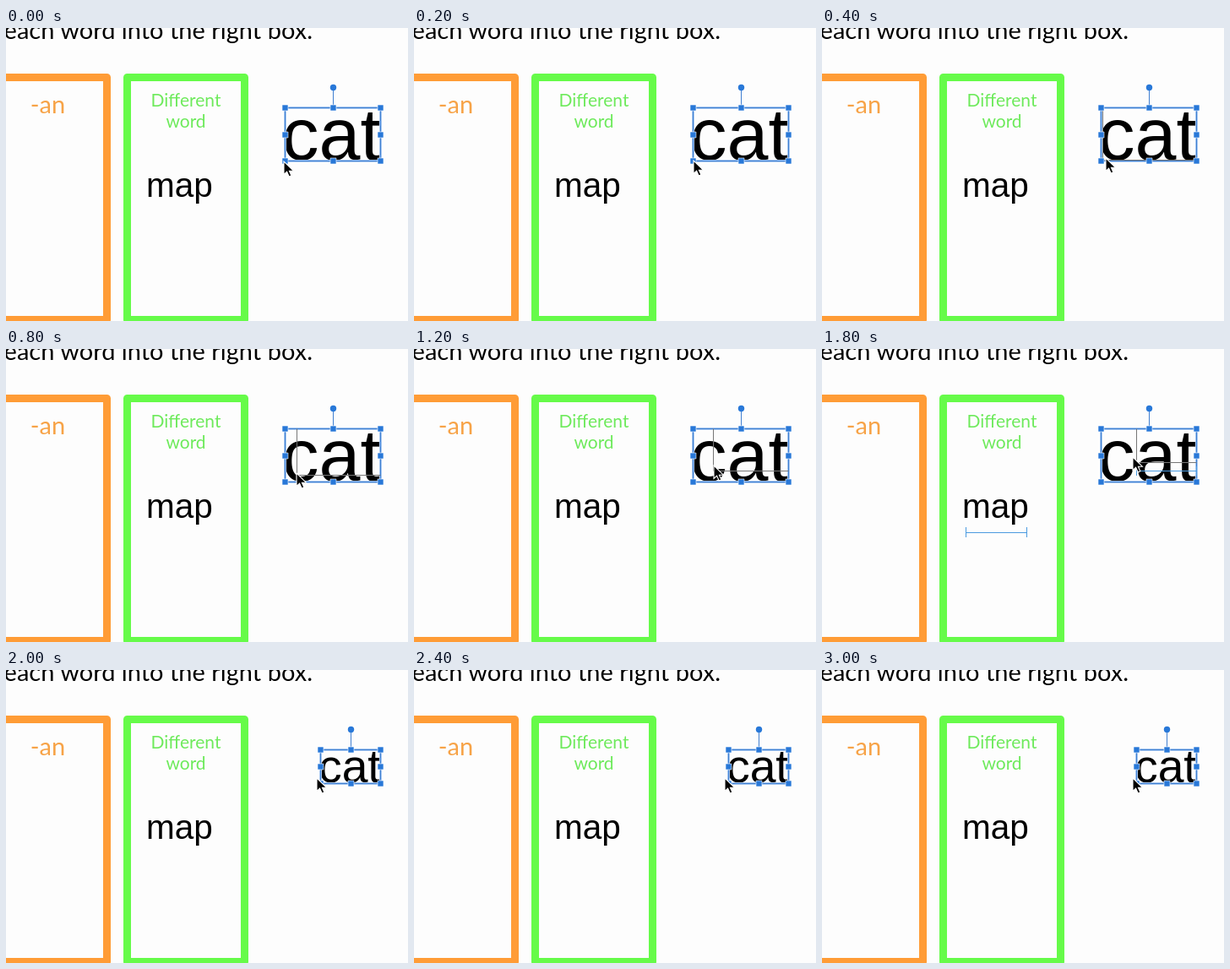
Animation of 476 by 347 pixels, one loop 3200 ms. Source, as an HTML page:

```html
<!DOCTYPE html>
<html lang="en">
<head>
<meta charset="utf-8">
<title>Resizing a word</title>
<style>
  html, body { margin: 0; width: 100%; height: 100%; overflow: hidden; background: #fdfdfd; }
  svg { display: block; }
  text { font-family: Lato, sans-serif; }
  .word { font-family: "Liberation Sans", Arial, sans-serif; fill: #000; }
  .card { fill: none; stroke-width: 9; stroke-linejoin: round; }
  .guide { fill: none; stroke: #4b9be0; }
  .glow { fill: none; stroke: #a9c9f2; stroke-width: 3; }
  .edge { fill: none; stroke: #3f7fd0; }
  .handle { fill: #2878d8; stroke: #fff; stroke-width: .6; }
  .preview { fill: none; stroke: #777; }
</style>
</head>
<body>
<svg width="476" height="347" viewBox="0 0 476 347">
  <rect width="476" height="347" fill="#fdfdfd"/>
  <text x="363" y="12.5" font-size="29" text-anchor="end">each word into the right box.</text>

  <rect class="card" x="-40" y="58.5" width="159.5" height="287" stroke="#ff9c36"/>
  <text x="49.5" y="101" font-size="29" text-anchor="middle" fill="#f7a347">-an</text>

  <rect class="card" x="143.5" y="58.5" width="139" height="287" stroke="#66fb49"/>
  <g font-size="21" text-anchor="middle" fill="#6eea5c">
    <text x="213" y="92.5">Different</text>
    <text x="213" y="117.5">word</text>
  </g>
  <text class="word" x="166" y="200" font-size="40.5">map</text>

  <text class="word" id="cat">cat</text>
  <rect class="glow" id="glow"/>
  <rect class="edge" id="edge"/>
  <path class="preview" id="preview"/>
  <path class="guide" id="guides" d="M170.5 211v12M242.5 211v12M170.5 217.5h72M372.5 139v11M443.5 139v11M372.5 144.5h71"/>
  <path class="edge" id="stem"/>
  <circle id="knob" cy="70.5" r="3.7" fill="#2878d8"/>
  <path class="handle" id="handles"/>
  <path id="cursor" d="M0 0V15.5L3.6 12.2L6.2 18L8.9 16.8L6.4 11.2H11.4Z" stroke="#fff" stroke-width="1.1"/>
</svg>
<script>
const LOOP = 3200, STEP = 200;
const RIGHT = 443.5, TOP = 94.5, FULL = { left: 330.5, height: 63 }, SMALL = { left: 372.5, height: 40 };
const RELEASE = 2000;

// Each step: pointer x, pointer y, left edge of the preview (0 hides it)
const drag = [
  [329, 158, 0], [331, 157, 0], [336, 154, 332.5], [340, 151, 339.5], [344, 147, 344.5],
  [349, 143, 349.5], [355, 138, 354.5], [357, 136, 356.5], [365, 130, 364.5], [368, 128, 372.5]
];

const $ = id => document.getElementById(id);
const set = (id, attrs) => {
  for (const name in attrs) $(id).setAttribute(name, attrs[name]);
};
const show = (id, visible) => set(id, { visibility: visible ? "visible" : "hidden" });

function drawSelection({ left, height }) {
  const width = RIGHT - left, middle = Math.floor(left + width / 2) + .5;
  const scale = width / (RIGHT - FULL.left);
  const box = { x: left, y: TOP, width, height };
  set("glow", box);
  set("edge", box);
  set("cat", { x: left - 4 * scale, y: TOP + 61.5 * scale, "font-size": 88 * scale });
  set("stem", { d: `M${middle} 71V${TOP}` });
  set("knob", { cx: middle });

  let path = "";
  [left, middle, RIGHT].forEach((x, column) => {
    [TOP, TOP + Math.round(height / 2), TOP + height].forEach((y, row) => {
      if (column !== 1 || row !== 1) path += `M${x - 3.5} ${y - 3.5}h7v7h-7z`;
    });
  });
  set("handles", { d: path });
}

function draw(now) {
  const time = now % LOOP, step = Math.floor(time / STEP);
  const [x, y, previewLeft] = drag[Math.min(step, drag.length - 1)];
  const dragging = time < RELEASE;

  drawSelection(dragging ? FULL : SMALL);
  set("cursor", { transform: `translate(${x} ${y})` });

  const ratio = FULL.height / (RIGHT - FULL.left);
  const bottom = Math.round((RIGHT - previewLeft) * ratio) + TOP;
  set("preview", { d: `M${previewLeft} ${TOP}V${bottom}H${RIGHT}` });
  show("preview", dragging && previewLeft);
  show("guides", dragging && step === drag.length - 1);
}

const start = performance.now();
function tick() {
  draw(performance.now() - start);
  requestAnimationFrame(tick);
}
tick();
</script>
</body>
</html>
```
